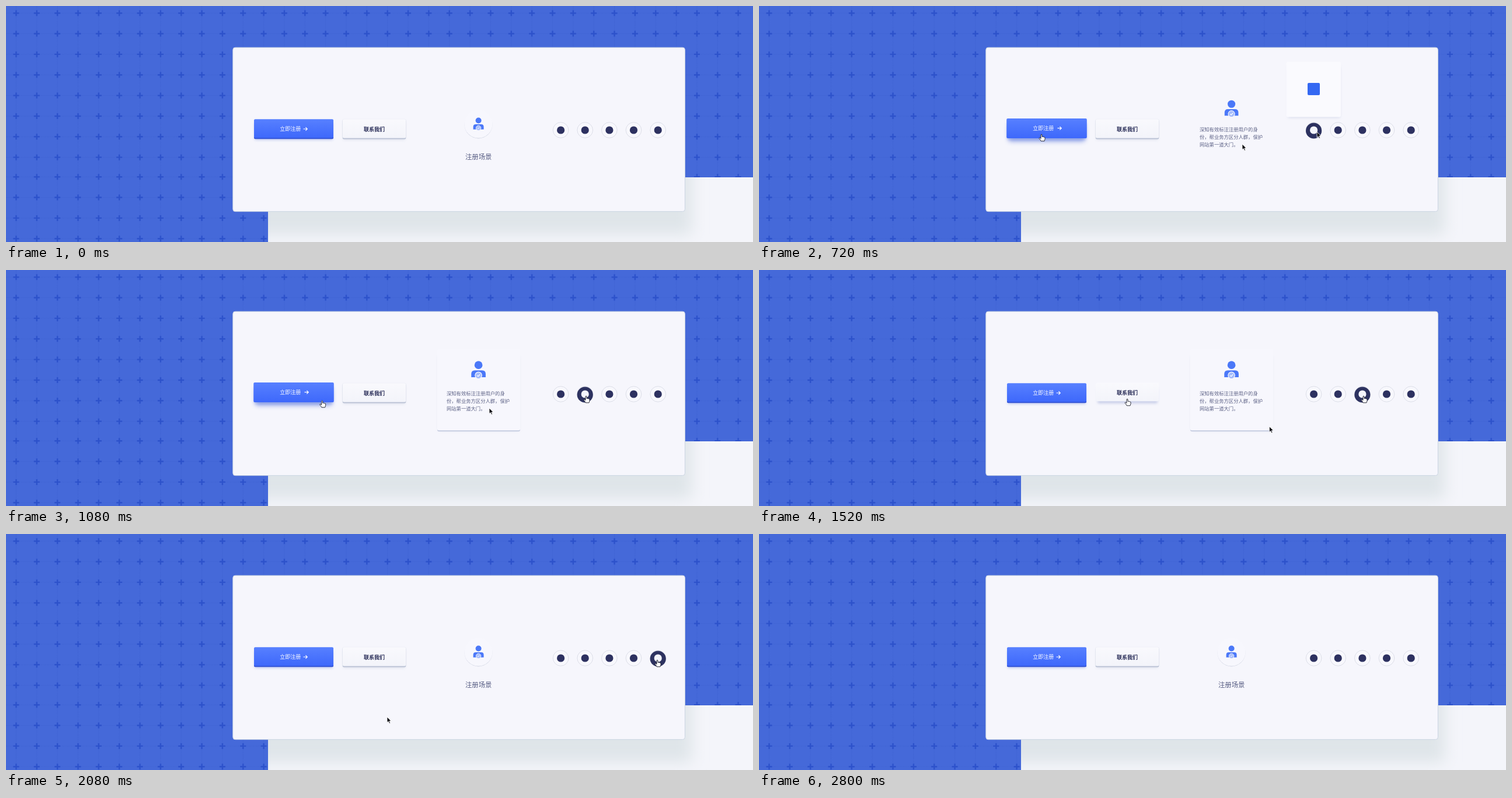
Recreate the animation shown at these times as an HTML page. Size 1280 by 405 pixels, loop 4160 ms.

```html
<!DOCTYPE html>
<html lang="zh-CN">
<head>
<meta charset="utf-8">
<title>Hover states</title>
<style>
  html, body { margin: 0; height: 100%; overflow: hidden; background: #4569d9; }
  svg { display: block; width: 100vw; height: 100vh; }
  text { font-family: "Noto Sans CJK SC", "Noto Sans CJK", "Noto Sans SC", sans-serif; font-size: 9px; }
  .mid { text-anchor: middle; }
</style>
</head>
<body>
<svg viewBox="0 0 1280 405">
  <defs>
    <linearGradient id="blue" x2="0" y2="1">
      <stop stop-color="#5780ff"/><stop offset="1" stop-color="#3e68fb"/>
    </linearGradient>
    <linearGradient id="pale" x2="0" y2="1">
      <stop stop-color="#f9f9fd"/><stop offset="1" stop-color="#f3f4fa"/>
    </linearGradient>
    <filter id="blur2" x="-20%" y="-60%" width="140%" height="220%"><feGaussianBlur stdDeviation="2"/></filter>
    <filter id="blur4" x="-20%" y="-60%" width="140%" height="220%"><feGaussianBlur stdDeviation="4"/></filter>
    <filter id="blur14" x="-10%" y="-20%" width="120%" height="140%"><feGaussianBlur stdDeviation="13"/></filter>
    <clipPath id="floor"><path d="M449 294H1280V405H449z"/></clipPath>
    <path id="arrow" d="M0 0V9.6L2.2 7.6L3.8 11.2L5.5 10.5L3.9 7H7z"
      fill="#0b0b12" stroke="#fff" stroke-width=".8"/>
    <path id="hand" d="M-1 1Q0-.8 1 1V4.4Q2.2 3.6 2.8 4.7Q4 4 4.5 5.2Q5.8 4.7 6 6.2V8.5Q5.6 10 5 11.8H-.8Q-1.6 10-3.8 7.4Q-4.2 5.8-2.5 6.2L-1 7.5z"
      fill="#fff" stroke="#161824" stroke-width=".9" stroke-linejoin="round"/>
  </defs>

  <path d="M0 0H1280V405H0z" fill="#4569d9"/>
  <path id="lines" stroke="#3557c6" stroke-opacity=".4" stroke-dasharray="1.2 1.4"/>
  <path id="pluses" stroke="#2d52cb" stroke-width="2.4"/>
  <path d="M449 294H1280V405H449z" fill="#f4f5fa"/>
  <g clip-path="url(#floor)">
    <rect x="410" y="110" width="765" height="282" fill="#dfe5e9" filter="url(#blur14)"/>
  </g>
  <rect x="388.8" y="71.2" width="774.6" height="281.5" rx="4" fill="#f6f6fc" stroke="#cbd5e2"/>

  <!-- primary button -->
  <rect id="glow1" x="428" y="203" width="130" height="29" rx="3" fill="#3f62d8" filter="url(#blur4)"/>
  <rect x="426" y="200" width="134" height="30" rx="2" fill="#8c9fe0" opacity=".5" filter="url(#blur2)"/>
  <g id="rest1"><rect x="425" y="196" width="136" height="32.3" rx="2" fill="#3555d6"/></g>
  <rect id="face1" rx="2" fill="url(#blue)"/>
  <g id="label1" fill="#fff">
    <text class="mid" x="487.3" y="214.2" font-weight="500">立即注册</text>
    <path id="go" d="M509.5 211H516M513.4 208.2L516.2 211L513.4 213.8" fill="none" stroke="#fff" stroke-width="1.2"/>
  </g>

  <!-- secondary button -->
  <rect id="glow2" x="580" y="203" width="103" height="26" rx="3" fill="#b7bfe2" filter="url(#blur2)"/>
  <g id="rest2">
    <rect x="578" y="200" width="106" height="30" rx="2" fill="#c9cfdf" opacity=".5" filter="url(#blur2)"/>
    <rect x="576.8" y="195" width="108.4" height="33.4" rx="2" fill="#b9c1d4"/>
    <rect x="576.8" y="194.3" width="108.4" height="32" rx="2" fill="#f8f8fd" stroke="#e3e5ef" stroke-width=".9"/>
  </g>
  <rect id="face2" x="577" y="194.2" width="108" height="32" rx="2" fill="url(#pale)"/>
  <text id="label2" class="mid" x="631" y="214.6" font-weight="700" fill="#262a55">联系我们</text>

  <!-- scene card -->
  <g id="tile">
    <rect x="740" y="146" width="140" height="131" rx="3" fill="#d4d9ea" opacity=".5" filter="url(#blur2)"/>
    <rect x="739" y="137" width="142" height="140" rx="3" fill="#c3cadf"/>
    <rect x="738.8" y="135" width="142.4" height="140.3" rx="3" fill="#f7f7fd"/>
  </g>
  <g id="disc">
    <circle cx="809.5" cy="203.4" r="24" fill="#d0d4e2"/>
    <circle cx="809.5" cy="202.4" r="24.2" fill="#f7f7fd"/>
  </g>
  <g id="person">
    <circle r="5" fill="#4b78f8"/>
    <path d="M-9 15.2V11Q-9 6.6-4.6 6.6H4.6Q9 6.6 9 11V15.2z" fill="#4b78f8"/>
    <circle cy="12.9" r="4.2" fill="#a5bcfb" stroke="#f7f7fd" stroke-width=".9"/>
    <path d="M-1.8 12.9L-.4 14.2L1.9 11.6" fill="none" stroke="#fff" stroke-width=".9"/>
  </g>
  <text id="caption" class="mid" x="809.7" y="263" style="font-size:11.4px" fill="#565c82">注册场景</text>
  <g id="note" fill="#5d6286">
    <text x="755" y="215" style="font-size:8.32px">深知有效标注注册用户的身</text>
    <text x="755" y="228" style="font-size:8.32px">份，帮业务方区分人群，保护</text>
    <text x="755" y="241" style="font-size:8.32px">网站第一道大门。</text>
  </g>

  <!-- popover -->
  <g id="popover">
    <rect x="906" y="104" width="90" height="88" rx="3" fill="#cfd5e8" opacity=".7" filter="url(#blur2)"/>
    <rect x="903.5" y="95.5" width="93.5" height="95" rx="3" fill="#fafafe"/>
    <rect x="940" y="132" width="21" height="21" rx="2" fill="#3468f2"/>
  </g>
  <g id="social"></g>

  <use id="cursor0"/><use id="cursor1"/><use id="cursor2"/>
</svg>
<script>
const LOOP = 4160;
const $ = id => document.getElementById(id);
const set = (el, attrs) => { for (const k in attrs) el.setAttribute(k, attrs[k]); };
const clamp = v => Math.max(0, Math.min(1, v));
const smooth = p => p * p * (3 - 2 * p);
const mix = (a, b, p) => a + (b - a) * p;
const ramp = (t, start, length) => smooth(clamp((t - start) / length));
const pulse = (t, on, off, length) => ramp(t, on, length) - ramp(t, off, length);

// Background grid
const columns = Array.from({ length: 37 }, (_, i) => 17.4 + i * 35.35);
const rows = Array.from({ length: 12 }, (_, i) => 12.2 + i * 35.35 - (i > 7 ? 1.8 : 0));
$('lines').setAttribute('d',
  columns.map(x => `M${x} 0V405`).join('') + rows.map(y => `M0 ${y}H1280`).join(''));
$('pluses').setAttribute('d',
  columns.flatMap(x => rows.map(y => `M${x - 5} ${y}h10M${x} ${y - 5}v10`)).join(''));

// Round buttons: centre x, hover start, hover end
const badges = [
  [950.6, 540, 850], [992.2, 880, 1290], [1033.9, 1310, 1660],
  [1075.5, 1680, 1940], [1117.2, 1960, 2400]
].map(([x, on, off]) => {
  const add = attrs => {
    const c = document.createElementNS('http://www.w3.org/2000/svg', 'circle');
    set(c, { cx: x, cy: 213, ...attrs });
    return $('social').appendChild(c);
  };
  add({ r: 13.3, fill: '#f8f8fd', stroke: '#d9dbe5', 'stroke-width': .9 });
  return {
    on, off,
    dark: add({ r: 13.6, fill: '#2d3260' }),
    mark: add({ r: 6.6, fill: '#2d3160' }),
    light: add({ r: 6.6, fill: '#f4f5fc' })
  };
});

// Cursor stops: time, x, y, optional bow of the path leading there
const cursors = [
  { hand: [[390, 1122], [1157, 1676]], end: 2120,
    stops: [[160, 653, 314], [440, 484, 220], [880, 484, 220], [1350, 631, 221, 3.8],
            [1600, 631, 221], [2060, 653, 314]] },
  { hand: [], end: 1600,
    stops: [[360, 880, 275], [680, 828, 237], [1240, 828, 237], [1600, 881, 273]] },
  { hand: [[880, 2400]], end: 2560,
    stops: [[160, 1013, 245], [600, 956, 216], [720, 956, 216], [1000, 994, 216],
            [1160, 994, 216], [1440, 1036, 216], [1540, 1036, 216], [1780, 1078, 216],
            [1840, 1078, 216], [2060, 1116, 216], [2300, 1116, 216], [2560, 1143, 275]] }
];

function place(stops, t) {
  const next = stops.findIndex(s => s[0] > t);
  if (next < 0) return stops[stops.length - 1].slice(1, 3);
  const [t0, x0, y0] = stops[next - 1], [t1, x1, y1, bow = 0] = stops[next];
  const p = smooth((t - t0) / (t1 - t0));
  return [mix(x0, x1, p), mix(y0, y1, p) + bow * Math.sin(Math.PI * p)];
}

function draw(t) {
  const h1 = pulse(t, 390, 1122, 100), h2 = pulse(t, 1157, 1676, 120);
  set($('face1'), { x: 425 - .8 * h1, y: 194.2 - 1.3 * h1, width: 136 + 1.6 * h1, height: 32 + 2 * h1 });
  set($('rest1'), { opacity: 1 - h1 });
  set($('glow1'), { opacity: .6 * h1 });
  set($('label1'), { transform: `translate(0 ${-1.3 * h1})` });
  set($('go'), { transform: `translate(${2 * h1} 0)` });

  set($('rest2'), { opacity: 1 - h2 });
  set($('face2'), { y: 194.2 - h2 });
  set($('glow2'), { opacity: .7 * h2 });
  set($('label2'), { transform: `translate(0 ${-h2})` });

  const lift = pulse(t, 540, 1560, 240);
  const swap = pulse(t, 540, 1600, 130);
  set($('person'), {
    transform: `translate(809.6 ${mix(196.5, 163.2, lift)}) scale(${mix(1, 1.37, lift)})`
  });
  set($('disc'), { opacity: 1 - swap });
  set($('caption'), { opacity: 1 - swap });
  set($('note'), { opacity: swap });
  set($('tile'), { opacity: pulse(t, 740, 1560, 200) });
  set($('popover'), { opacity: pulse(t, 560, 860, 140) });

  for (const { on, off, dark, mark, light } of badges) {
    const h = pulse(t, on, off, 80);
    set(dark, { opacity: h, cy: 213 + h });
    set(mark, { opacity: 1 - h });
    set(light, { opacity: h });
  }

  cursors.forEach(({ hand, end, stops }, i) => {
    const visible = t > stops[0][0] && t < end;
    const [x, y] = visible ? place(stops, t) : [0, 0];
    const kind = hand.some(([a, b]) => t >= a && t < b) ? 'hand' : 'arrow';
    set($('cursor' + i), {
      href: '#' + kind,
      transform: `translate(${x} ${y})`,
      visibility: visible ? 'visible' : 'hidden'
    });
  });
}

const start = performance.now();
function tick() {
  draw((performance.now() - start) % LOOP);
  requestAnimationFrame(tick);
}
tick();
</script>
</body>
</html>
```
